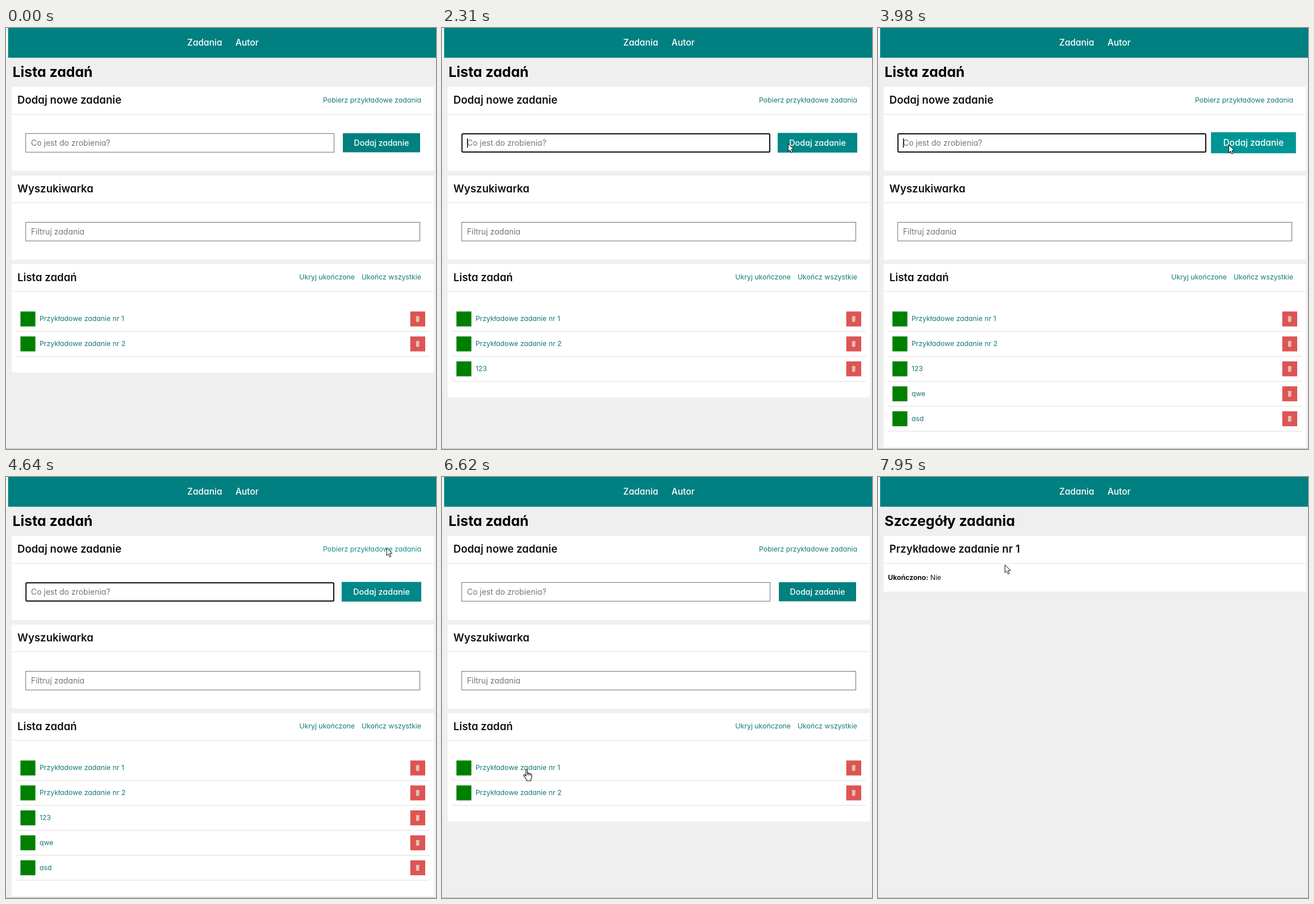
These frames come from a looping animation (757 px wide and 740 px high, 8 s). An HTML page:

```html
<!DOCTYPE html>
<html lang="pl">
<head>
<meta charset="utf-8">
<title>Lista zadań</title>
<style>
  html, body { margin: 0; width: 100%; height: 100%; overflow: hidden; background: #efefef; }
  svg { display: block; width: 757px; height: 740px; }
  text { font-family: Inter, "Open Sans", sans-serif; font-feature-settings: "cv11"; white-space: pre; }
</style>
</head>
<body>
<svg id="stage" viewBox="0 0 757 740" xmlns="http://www.w3.org/2000/svg"></svg>
<script>
const stage = document.getElementById('stage');
const LOOP = 8000;
const TEAL = '#008080';
const LINK = '#167a78';
const PAGE = '#efefef';

// Each step: start time and the values that change there.
const steps = [
  [0, { page: 'list', cursor: null, typed: '', focus: 0, caret: 0, grow: 0, glow: 0,
        link: 'Pobierz przykładowe zadania', extra: [] }],
  [330, { cursor: ['arrow', 437, 298] }],
  [660, { cursor: ['arrow', 373, 220] }],
  [990, { cursor: ['beam', 379, 220], focus: 1, caret: 1 }],
  [1320, { cursor: ['beam', 379, 213], typed: '1' }],
  [1650, { cursor: ['beam', 564, 213], typed: '123' }],
  [1980, { cursor: ['arrow', 609, 203], grow: .42 }],
  [2310, { typed: '', grow: .3, extra: ['123'] }],
  [2640, { cursor: ['arrow', 552, 227], typed: 'qwe', grow: 0 }],
  [2970, { cursor: ['arrow', 612, 204], grow: .42 }],
  [3320, { cursor: ['arrow', 617, 205], typed: 'a', grow: .88, extra: ['123', 'qwe'] }],
  [3650, { typed: 'asd', grow: 1 }],
  [3980, { typed: '', extra: ['123', 'qwe', 'asd'] }],
  [4310, { cursor: ['arrow', 660, 149], grow: .88 }],
  [4640, { cursor: ['arrow', 669.5, 124], caret: 0, grow: .3, glow: .6 }],
  [4970, { caret: 1, grow: 0, glow: 1 }],
  [5300, { focus: 0, caret: 0, link: 'Ładowanie' }],
  [5630, { cursor: ['arrow', 333, 443], glow: .4 }],
  [5960, { cursor: ['arrow', 151, 513], glow: 0 }],
  [6290, { link: 'Pobierz przykładowe zadania', extra: [] }],
  [6620, { cursor: ['hand', 143, 513] }],
  [6950, { page: 'details', cursor: ['arrow', 151, 513] }],
  [7290, { cursor: ['arrow', 180, 440] }],
  [7620, { cursor: ['arrow', 104, 172] }],
  [7950, { cursor: ['arrow', 223, 154] }]
];

const rect = (x, y, w, h, fill, more = '') =>
  `<rect x="${x}" y="${y}" width="${w}" height="${h}" fill="${fill}" ${more}/>`;

const text = (x, y, size, str, fill = '#111', more = '') =>
  `<text x="${x}" y="${y}" font-size="${size}" fill="${fill}" ${more}>${str}</text>`;

const title = str => text(11.5, 86, 24.8, str, '#000', 'font-weight="700"');

const nav = (x, str) => text(x, 31, 15.5, str, '#fff', 'font-weight="500"');

function card(y, h, heading, divider) {
  return rect(10, y, 743.5, h, '#fff') + rect(10, y + divider, 743.5, 2, PAGE) +
    text(20, y + 29.7, 18.6, heading, '#111', 'font-weight="600"');
}

const action = (x, y, str, fill = LINK) => text(x, y, 12.3, str, fill, 'text-anchor="end"');

function field(x, y, w, focus) {
  return focus
    ? rect(x + .5, y + .5, w - 1, 32, '#fff', 'stroke="#111" stroke-width="2" rx="1.5"')
    : rect(x, y, w, 32.8, '#fff', 'stroke="#707070"');
}

function button(grow) {
  const k = 1 + grow * .1;
  const c = Math.round(128 + 22 * grow);
  return `<g transform="translate(661 201.7) scale(${k})">` +
    rect(-68, -16.8, 136, 33.6, `rgb(0,${c},${c})`) +
    text(0, 5.2, 14, 'Dodaj zadanie', '#fff', 'text-anchor="middle" font-weight="500"') + '</g>';
}

function row(label, i) {
  const y = 498.3 + i * 43.85;
  return rect(25.4, y, 26.3, 26.3, '#008000') +
    text(59, y + 16.9, 12.3, label, LINK) +
    rect(711.7, y, 26.3, 26.3, '#de5454') +
    `<path d="M722.2 ${y + 8.8}h5l-.5 9h-4zM724.7 ${y + 10}v7"
       fill="#c9ab98" stroke="#f4e6d8" stroke-width=".9"/>` +
    rect(17, y + 34.2, 729, 1.6, '#e9e9e9');
}

function listPage(s) {
  const rows = ['Przykładowe zadanie nr 1', 'Przykładowe zadanie nr 2', ...s.extra];
  const g = s.glow;
  const linkFill = `rgb(${Math.round(22 - 6 * g)},${Math.round(122 + 33 * g)},${Math.round(120 + 36 * g)})`;
  return title('Lista zadań') +
    card(103.5, 147.5, 'Dodaj nowe zadanie', 47.5) +
    action(731, 130.7, s.link, linkFill) +
    field(34.7, 185.5, 542.8, s.focus) +
    text(44, 207, 14, s.typed || 'Co jest do zrobienia?', s.typed ? '#222' : '#757575', 'id="entry"') +
    button(s.grow) +
    card(259.5, 147.5, 'Wyszukiwarka', 46.5) +
    field(34.7, 341.5, 693.8, 0) +
    text(44, 363, 14, 'Filtruj zadania', '#757575') +
    card(415, 190.5 + 43.85 * s.extra.length, 'Lista zadań', 47) +
    action(614, 441.8, 'Ukryj ukończone') +
    action(731, 441.8, 'Ukończ wszystkie') +
    rows.map(row).join('');
}

function detailsPage() {
  return title('Szczegóły zadania') +
    card(103.5, 98, 'Przykładowe zadanie nr 1', 47.5) +
    text(17.5, 180.5, 12.2, '<tspan font-weight="700">Ukończono:</tspan> Nie');
}

const pointers = {
  arrow: '<path d="M.5 .5V14.2L3.7 11.2L5.9 16.5L8.2 15.5L6 10.3H10.3Z" fill="#fff" stroke="#111"/>',
  beam: '<path d="M-3 -7H-1Q0 -7 0 -6Q0 -7 1 -7H3M0 -6V6M-3 7H-1Q0 7 0 6Q0 7 1 7H3" fill="none" stroke="#111" stroke-width="1.2"/>',
  hand: `<path d="M4.7 12.8V2.3Q4.7 .7 6 .7T7.3 2.3V7.4Q8.8 6.5 9.8 8Q11.4 7.2 12.4 8.8
    Q15 8.4 15 11V14.6Q15 17 13.4 18.6V21H6V19Q4.4 16.8 2.2 13.8Q.2 11.2 1.4 10.2Q2.6 9.4 4.7 12.8Z
    M7.3 7.4V11.3M9.8 8V11.5M12.4 8.8V11.8" fill="#fff" stroke="#111" stroke-width="1.1" stroke-linejoin="round"/>`
};

const pointer = ([kind, x, y]) => `<g transform="translate(${x} ${y})">${pointers[kind]}</g>`;

function draw(s) {
  stage.innerHTML = rect(0, 0, 757, 740, PAGE) +
    rect(0, 0, 4, 52, '#fafafa') +
    rect(3.7, 0, 753.3, 52.3, TEAL) +
    nav(319, 'Zadania') +
    nav(404, 'Autor') +
    (s.page === 'list' ? listPage(s) : detailsPage()) +
    rect(0, 739, 757, 1, '#bdbdbd') +
    '<g id="top"></g>';
  let top = '';
  if (s.caret) {
    const w = s.typed ? document.getElementById('entry').getComputedTextLength() : 0;
    top += rect(44 + w, 194, 1.5, 16.5, '#111');
  }
  if (s.cursor) top += pointer(s.cursor);
  document.getElementById('top').innerHTML = top;
}

let shown = -1;
function update(now) {
  const t = now % LOOP;
  const n = steps.filter(([start]) => start <= t).length;
  if (n !== shown) {
    shown = n;
    draw(Object.assign({}, ...steps.slice(0, n).map(step => step[1])));
  }
}

const begin = performance.now();
function tick() {
  update(performance.now() - begin);
  requestAnimationFrame(tick);
}
tick();
</script>
</body>
</html>
```
